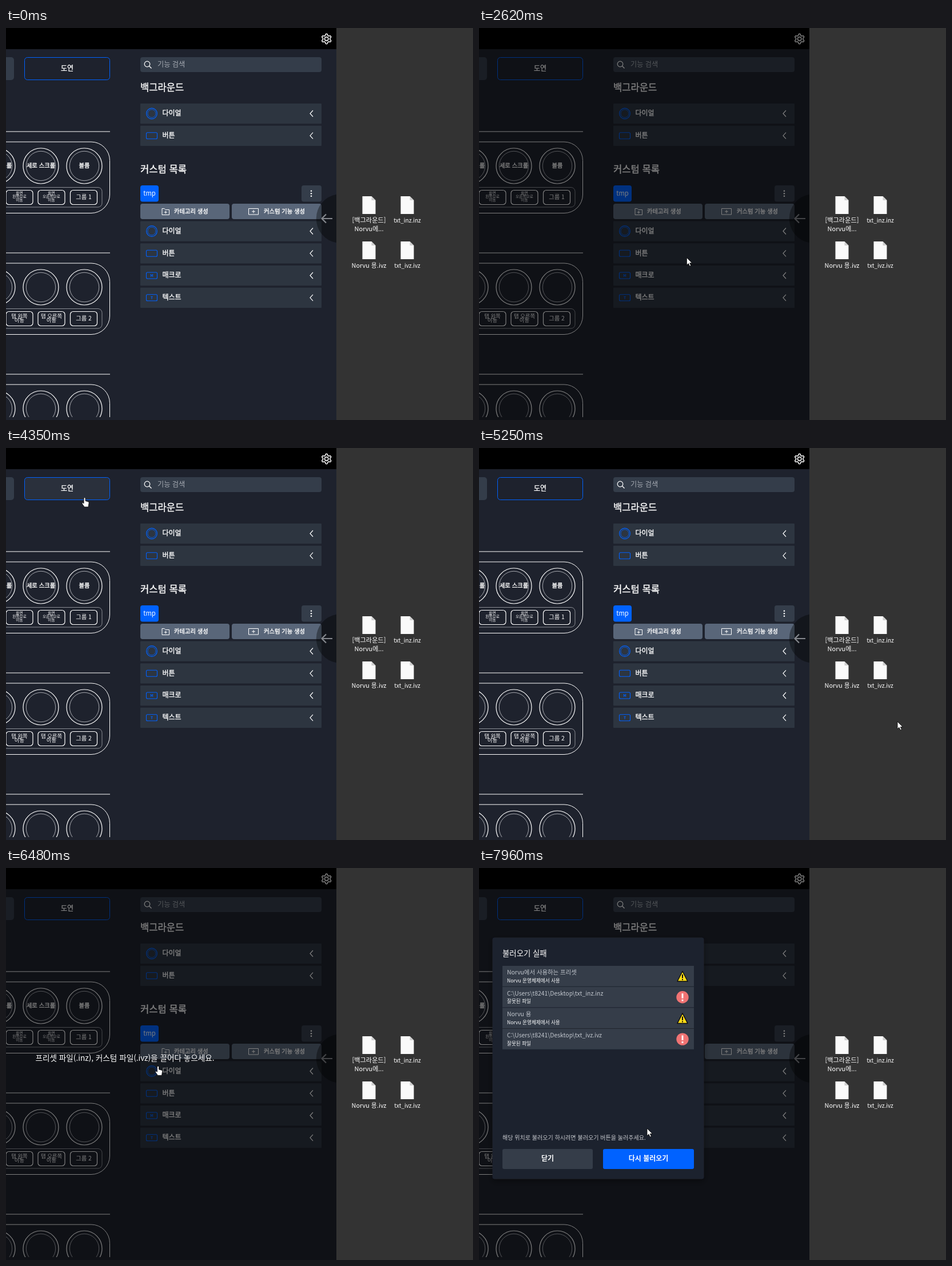
Write an HTML page that moves like this. It is 817x685 px and loops after 8000 ms.

```html
<!DOCTYPE html>
<html lang="ko">
<head>
<meta charset="utf-8">
<style>
html, body { margin: 0; width: 100%; height: 100%; overflow: hidden; background: #333; }
svg { display: block; width: 817px; height: 685px; }
text { font-family: "Noto Sans CJK KR", "Noto Sans CJK JP", "Noto Sans CJK", "Noto Sans", sans-serif; white-space: pre; }
.medium { stroke: #fff; stroke-width: .35px; }
</style>
</head>
<body>
<svg id="stage" viewBox="0 0 817 685" xmlns="http://www.w3.org/2000/svg"></svg>
<script>
const NAVY = '#1e222d', SLATE = '#343d4a', ROW = '#2d3540', STEEL = '#596679', BLUE = '#0062ff';

// Drawing helpers; text is placed by its vertical centre.
const rect = (x, y, w, h, fill, rx = 0, extra = '') =>
  `<rect x="${x}" y="${y}" width="${w}" height="${h}" rx="${rx}" fill="${fill}" ${extra}/>`;
const circle = (x, y, r, stroke, width = 1) =>
  `<circle cx="${x}" cy="${y}" r="${r}" fill="none" stroke="${stroke}" stroke-width="${width}"/>`;
const line = (d, stroke = '#fff', width = 1) =>
  `<path d="${d}" fill="none" stroke="${stroke}" stroke-width="${width}"/>`;
const text = (s, x, y, size, { fill = '#fff', weight = 400, anchor = 'start' } = {}) =>
  `<text x="${x}" y="${y + size * .37}" font-size="${size}" fill="${fill}" text-anchor="${anchor}" ` +
  (weight === 500 ? 'class="medium"' : `font-weight="${weight}"`) + `>${s}</text>`;
const mid = (s, x, y, size, weight = 400, fill = '#fff') =>
  text(s, x, y, size, { fill, weight, anchor: 'middle' });
const button = (s, x, y, w, h, fill) =>
  rect(x, y, w, h, fill, 3) + mid(s, x + w / 2, y + h / 2 - .5, 12, 700);

function gear(x, y) {
  let d = '';
  for (let i = 0; i < 48; i++) {
    const a = i / 48 * 2 * Math.PI;
    const r = 7.4 + 1.3 * Math.tanh(3 * Math.cos(6 * a));
    d += (i ? 'L' : 'M') + (x + r * Math.sin(a)).toFixed(2) + ' ' + (y - r * Math.cos(a)).toFixed(2);
  }
  return line(d + 'Z', '#fff', 1.5) + circle(x, y, 3.2, '#fff', 1.5);
}

function device(y, dials, keys) {
  let s = line(`M0 ${y + 1}H182`) +
    line(`M0 ${y + 19}H149a32.5 32.5 0 0 1 32.5 32.5V${y + 111}a32.5 32.5 0 0 1 -32.5 32.5H0`) +
    line(`M0 ${y + 98.5}H161a7 7 0 0 1 7 7V${y + 126}a7 7 0 0 1 -7 7H0`, '#8b8e95');
  [-15, 61, 137].forEach((x, i) => {
    s += circle(x, y + 61, 31, '#fff', 1.2) + circle(x, y + 61, 25.7, '#b4b6bb', .9) +
      mid(dials[i] || '', x, y + 60.5, 10.3, 500);
  });
  [23.5, 79.5, 136].forEach((x, i) => {
    const lines = keys[i].split('|'), n = lines.length;
    const [size, gap] = [[10.3, 0], [9.4, 7], [6.7, 6]][n - 1];
    s += rect(x - 23.5, y + 103.5, 47, 25, 'none', 5, 'stroke="#fff" stroke-width="1.2"');
    lines.forEach((l, k) => s += mid(l, x, y + 115 + (k - (n - 1) / 2) * gap, size));
  });
  return s;
}

function row(y, label, icon) {
  const c = y + 17.5;
  const mark = icon === 'dial'
    ? circle(255, c, 9.3, BLUE, 1.2) + circle(255, c, 7, BLUE, .8)
    : rect(245.5, c - 5.5, 19, 11, 'none', 2, `stroke="${BLUE}" stroke-width="1.1"`) +
      mid(icon, 255, c, 6.5, 700, BLUE);
  return rect(235, y, 317, 35.2, ROW, 1) + mark + text(label, 273.5, c - .5, 12, { weight: 500 }) +
    line(`M537 ${c - 5.5}l-5 5.5 5 5.5`, '#fff', 1.2);
}

const app = rect(0, 0, 578, 685, NAVY) + rect(0, 0, 578, 37, '#000') + gear(560.7, 19) +
  rect(-20, 51, 34, 40, SLATE, 5) +
  `<rect id="tab" x="32.5" y="51.5" width="149" height="39" rx="5" stroke="${BLUE}"/>` +
  mid('도연', 107, 70.5, 12, 500) +
  '<g clip-path="url(#panel)">' +
  device(180, ['가로 스크롤', '세로 스크롤', '볼륨'], ['화면|왼쪽으로|이동', '화면|오른쪽으로|이동', '그룹 1']) +
  device(392, [], ['탭 왼쪽|이동', '탭 오른쪽|이동', '그룹 2']) +
  device(604, [], ['', '', '']) + '</g>' +
  rect(235, 51, 317, 26, SLATE, 4) + circle(247, 63, 4.8, '#fff', 1.2) + line('M250.5 66.5l4 4', '#fff', 1.2) +
  text('기능 검색', 265, 63, 12.2, { fill: '#a6abb3' }) +
  text('백그라운드', 235, 104, 16.6, { weight: 500 }) +
  row(132, '다이얼', 'dial') + row(170.7, '버튼', '') +
  text('커스텀 목록', 235, 247, 16.6, { weight: 500 }) +
  rect(235, 275, 32, 28.5, BLUE, 4) + mid('tmp', 251, 289, 11.2) +
  rect(517, 275, 35, 28.5, SLATE, 4) +
  [284.8, 289.3, 293.8].map(y => `<circle cx="534" cy="${y}" r="1.3" fill="#fff"/>`).join('') +
  rect(235, 307, 156, 27, STEEL, 4) + rect(395, 307, 157, 27, STEEL, 4) +
  line('M273 326.5V315.5h4l2 2h6.5v9ZM279.3 319.5v5M276.8 322h5') +
  line('M424.5 315.5h17v10.5h-17ZM433 318v5.5M430.2 320.7h5.6') +
  text('카테고리 생성', 294, 320, 10.3, { weight: 500 }) +
  text('커스텀 기능 생성', 451, 320, 10.3, { weight: 500 }) +
  row(337.5, '다이얼', 'dial') + row(376.3, '버튼', '') + row(415, '매크로', 'M') + row(453.8, '텍스트', 'T') +
  '<path d="M578 290.7A43 43 0 0 0 578 375.3Z" opacity=".37"/>' +
  line('M571 333H553M560 325.5L552.5 333L560 340.5', '#85888e', 2.2);

const cells = [[635, 289], [702, 289], [635, 368], [702, 368]];
const page = ([x, y]) =>
  `<path d="M${x - 11.5} ${y + 5}h16l7 7v24h-23Z" fill="#fafafa"/><path d="M${x + 4.5} ${y + 5}v7h7Z" fill="#cfcfcf"/>`;
const files = cells.map(([x, y], i) =>
    `<rect class="pick" x="${x - 32.5}" y="${y + .5}" width="66" height="${i ? 60 : 70}" fill="#fff" fill-opacity=".2" stroke="#888"/>`).join('') +
  cells.map(page).join('') +
  mid('[백그라운드]', 635, 336, 11.2) + mid('Norvu에...', 635, 350.5, 11) +
  mid('txt_inz.inz', 702, 336, 10) + mid('Norvu 용.ivz', 635, 415, 10.9) + mid('txt_ivz.ivz', 702, 415, 10);

const confirmBox = rect(20, 248, 376, 168.5, SLATE, 3) + rect(20, 248, 376, 49, NAVY, 3) +
  mid('전체 설정 가져오기', 208, 272, 15.2, 700, '#0d66ff') +
  line('M373.5 267.5l11 11M384.5 267.5l-11 11', '#fff', 1.8) +
  mid('정말 전체 설정을 가져오시겠습니까?', 208, 325, 10.25) +
  mid('전체 설정을 가져오시면 기존에 있던 설정 값은 모두 사라지게 됩니다.', 208, 341, 10.25) +
  button('취소', 71, 369, 133, 35, STEEL) + button('확인', 212, 369, 133, 35, BLUE);

const warning = y => `<path d="M356 ${y - 8.5}l9 17.5h-18Z" fill="#ffdc16" stroke="#111" stroke-width="1.5" stroke-linejoin="round"/>` +
  line(`M356 ${y - 3}v6.5M356 ${y + 5}v2`, '#111', 2);
const failure = y => `<circle cx="356" cy="${y}" r="10.7" fill="#f07373"/>` +
  line(`M356 ${y - 6.5}v8.5M356 ${y + 4}v2.8`, '#fff', 2.8);
const failed = [
  ['Norvu에서 사용하는 프리셋', 'Norvu 운영체제에서 사용', warning],
  ['C:\\Users\\t8241\\Desktop\\txt_inz.inz', '잘못된 파일', failure],
  ['Norvu 용', 'Norvu 운영체제에서 사용', warning],
  ['C:\\Users\\t8241\\Desktop\\txt_ivz.ivz', '잘못된 파일', failure]
];
const failBox = rect(23.5, 121.5, 370, 422, NAVY, 4) + text('불러오기 실패', 41, 149, 13.4) +
  failed.map(([name, why, icon], i) => {
    const y = 171 + i * 36.7;
    return rect(41, y, 335, 35.7, SLATE) + text(name, 49, y + 11, 10.4, { fill: '#c3c7cd' }) +
      text(why, 49, y + 25.5, 8.6) + icon(y + 18);
  }).join('') +
  text('해당 위치로 불러오기 하시려면 불러오기 버튼을 눌러주세요.', 41, 471, 10.05, { fill: '#c3c7cd' }) +
  button('닫기', 41, 491, 158, 35, SLATE) + button('다시 불러오기', 217, 491, 159, 35, BLUE);

stage.innerHTML = `<defs><clipPath id="panel"><rect width="190" height="680"/></clipPath>
  <filter id="shadow"><feDropShadow dx="0" dy="4" stdDeviation="6" flood-opacity=".4"/></filter></defs>` +
  rect(0, 0, 817, 685, '#333') + app + rect(0, 0, 578, 685, '#000', 0, 'id="dim"') + files +
  `<g id="hint">${mid('프리셋 파일(.inz), 커스텀 파일(.ivz)을 끌어다 놓으세요.', 208, 331.5, 13.6)}</g>
  <g id="ask" filter="url(#shadow)">${confirmBox}</g><g id="fail" filter="url(#shadow)">${failBox}</g>
  <rect id="band" fill="#0078d7" fill-opacity=".3" stroke="#0078d7"/>
  <g id="cursor" stroke="#000" stroke-width=".8" fill="#fff">
    <path id="arrow" d="M0 0V13L3 10.3L5.2 15L7.4 14L5.3 9.5H9.4Z"/>
    <path id="hand" d="M-1.5 1.2Q0 -1 1.5 1.2V6L6.3 7.2Q7.7 7.7 7.6 9.5L6.5 16.5H-.5L-4.6 10.5Q-4.8 8.6 -2.8 9.2L-1.5 10.3Z"/>
  </g>`;

const $ = id => document.getElementById(id);
const clamp = v => Math.max(0, Math.min(1, v));
const ramp = (t, a, b) => clamp((t - a) / (b - a));
const fade = (t, a, b, c, d) => ramp(t, a, b) * (1 - ramp(t, c, d));
const within = (t, a, b) => t >= a && t < b;

// Pointer stops: time, x, y
const path = [
  [210, 707, 645], [560, 214, 121], [980, 478, 291], [1070, 478, 291], [1210, 511, 309], [1360, 511, 309],
  [1560, 533, 287], [2270, 533, 287], [3030, 150, 545], [3440, 150, 545], [3520, 116, 122], [3720, 107, 72],
  [4210, 118, 76], [4280, 118, 76], [4900, 656, 365], [5040, 656, 365], [5250, 732, 478], [5380, 790, 478],
  [5430, 790, 478], [5740, 606, 293], [5790, 606, 293], [5860, 626, 312], [6470, 266, 346], [6690, 266, 346],
  [6930, 297, 387], [7520, 297, 387], [7800, 294, 455], [8000, 294, 455]
];

function pointer(t) {
  const i = Math.max(1, path.findIndex(p => p[0] > t));
  const [t0, x0, y0] = path[i - 1], [t1, x1, y1] = path[i];
  const k = ramp(t, t0, t1), e = k * k * (3 - 2 * k);
  return [x0 + (x1 - x0) * e, y0 + (y1 - y0) * e];
}

function draw(t) {
  const [x, y] = pointer(t);
  const ask = fade(t, 6690, 6800, 7080, 7230), fail = ramp(t, 7340, 7540);
  const hint = within(t, 6000, 6690) ? ramp(t, 6000, 6120) : 0;
  const dim = Math.max(fade(t, 1680, 1880, 3080, 3300), fade(t, 6000, 6120, 7080, 7230), fail);
  const onTab = x > 32 && x < 182 && y > 51 && y < 91;
  const hand = onTab || within(t, 1480, 1800) || within(t, 6050, 6690) || within(t, 6850, 7150);
  $('dim').setAttribute('opacity', dim * .5);
  $('hint').setAttribute('opacity', hint);
  $('ask').setAttribute('opacity', ask);
  $('fail').setAttribute('opacity', fail);
  $('tab').setAttribute('fill', onTab ? '#2a303c' : NAVY);

  const dragging = within(t, 5430, 5760);
  const band = { x, y, width: 790 - x, height: 478 - y, opacity: dragging ? 1 : 0 };
  for (const k in band) $('band').setAttribute(k, Math.max(0, band[k]));
  document.querySelectorAll('.pick').forEach((p, i) => {
    const [cx, cy] = cells[i];
    const hit = within(t, 5760, 6420) || dragging && x < cx + 33 && y < cy + 60;
    p.setAttribute('opacity', hit ? 1 : 0);
  });

  $('cursor').setAttribute('transform', `translate(${x} ${y})`);
  $('cursor').setAttribute('opacity', t < 210 ? 0 : 1);
  $('hand').setAttribute('opacity', hand ? 1 : 0);
  $('arrow').setAttribute('opacity', hand ? 0 : 1);
}

(function tick() {
  draw(performance.now() % 8000);
  requestAnimationFrame(tick);
})();
</script>
</body>
</html>
```
